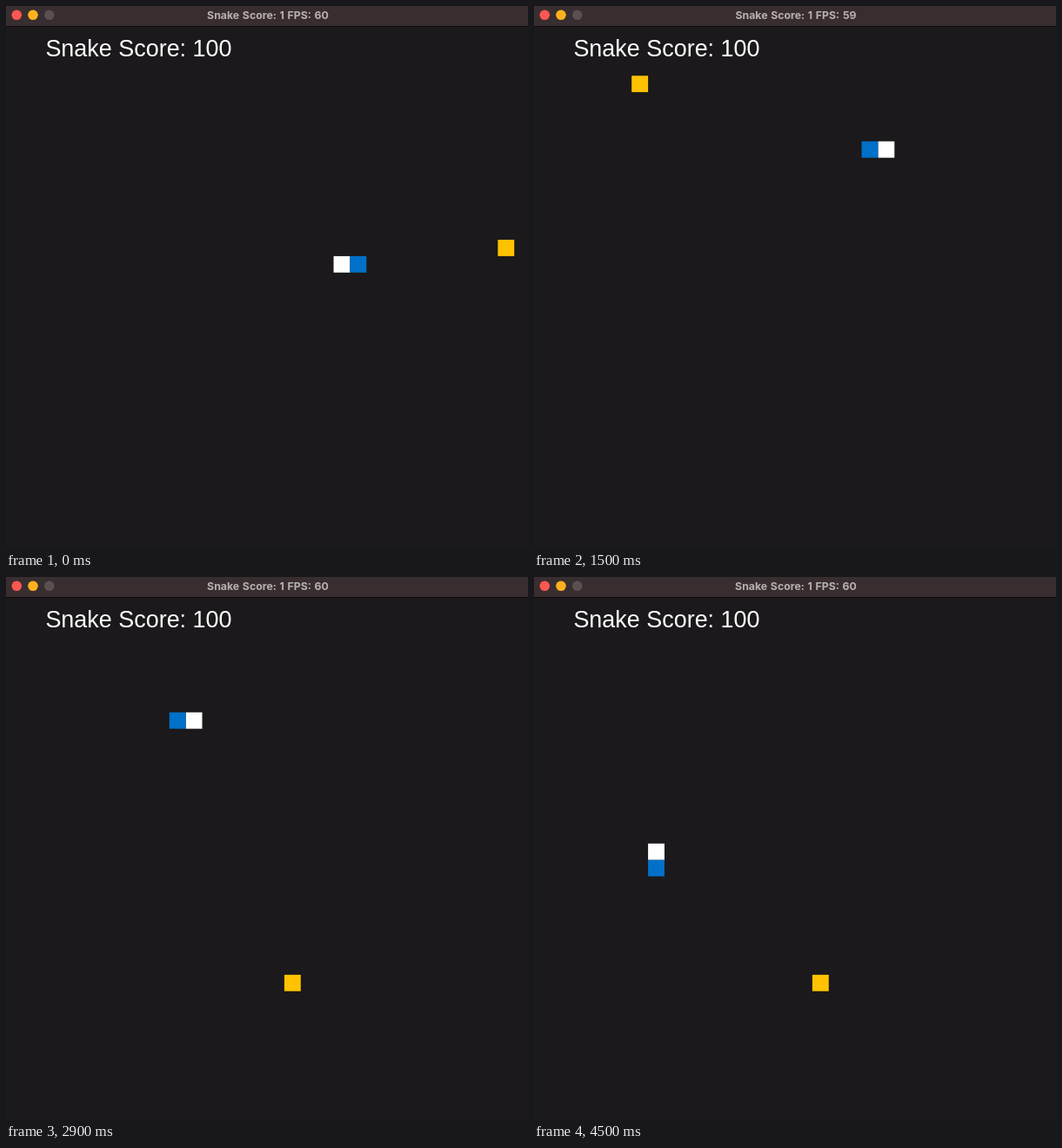
An HTML page for the animation above (4.6 s loop, 600x625 px).

```html
<!DOCTYPE html>
<html lang="en">
<head>
<meta charset="utf-8">
<title>Snake</title>
<style>
  html, body { margin: 0; width: 100%; height: 100%; overflow: hidden; background: #1b191b; }
  svg { display: block; width: 600px; height: 625px; }
  .title { font: 700 12.3px Inter, sans-serif; word-spacing: 0.8px; fill: #b9b1b1; text-anchor: middle; }
  .score { font: 26.95px "Liberation Sans", Arial, sans-serif; fill: #fff; }
</style>
</head>
<body>
<svg viewBox="0 0 600 625">
  <rect width="600" height="625" fill="#1b191b"/>
  <rect width="600" height="23" fill="#392e2f"/>
  <rect y="23" width="600" height="1" fill="#0c0a0b"/>
  <circle cx="12.3" cy="10.3" r="5.8" fill="#fc5650"/>
  <circle cx="31" cy="10.3" r="5.8" fill="#fdb11f"/>
  <circle cx="49.8" cy="10.3" r="5.8" fill="#5b5051"/>
  <text class="title" id="title" x="301" y="14.6"></text>
  <text class="score" x="45.4" y="58">Snake Score: 100</text>
  <rect id="food" fill="#ffc200"/>
  <rect id="tail" fill="#fff"/>
  <rect id="head" fill="#0070c8"/>
</svg>
<script>
  const LOOP = 4600, TICK = 100, CELL = 18.88, LEFT = -1.05, TOP = 80.25;
  const [title, food, tail, head] = ['title', 'food', 'tail', 'head'].map(id => document.getElementById(id));

  for (const el of [food, tail, head]) {
    el.setAttribute('width', CELL);
    el.setAttribute('height', CELL);
  }

  // Ticks on which the snake rests
  const rests = [3, 6, 9, 12, 15, 18, 21, 25, 28, 32, 37, 40, 43];

  // Legs of the route: column step, row step, length
  const path = [[20, 11], [21, 11]];
  for (const [dx, dy, count] of [[1, 0, 1], [0, -1, 7], [-1, 0, 15], [0, 1, 9]]) {
    for (let i = 0; i < count; i++) {
      const [x, y] = path[path.length - 1];
      path.push([x + dx, y + dy]);
    }
  }

  function place(el, [col, row]) {
    el.setAttribute('x', LEFT + col * CELL);
    el.setAttribute('y', TOP + row * CELL);
  }

  function draw(t) {
    const tick = Math.floor(t / TICK);
    const moves = tick - rests.filter(r => r <= tick).length;
    place(tail, path[moves]);
    place(head, path[moves + 1]);
    place(food, t < 700 ? [30, 10] : t < 2700 ? [6, 0] : [17, 20]);
    title.textContent = `Snake Score: 1 FPS: ${t >= 900 && t < 2900 ? 59 : 60}`;
  }

  const start = performance.now();
  function loop() {
    draw((performance.now() - start) % LOOP);
    requestAnimationFrame(loop);
  }
  draw(0);
  requestAnimationFrame(loop);
</script>
</body>
</html>
```
